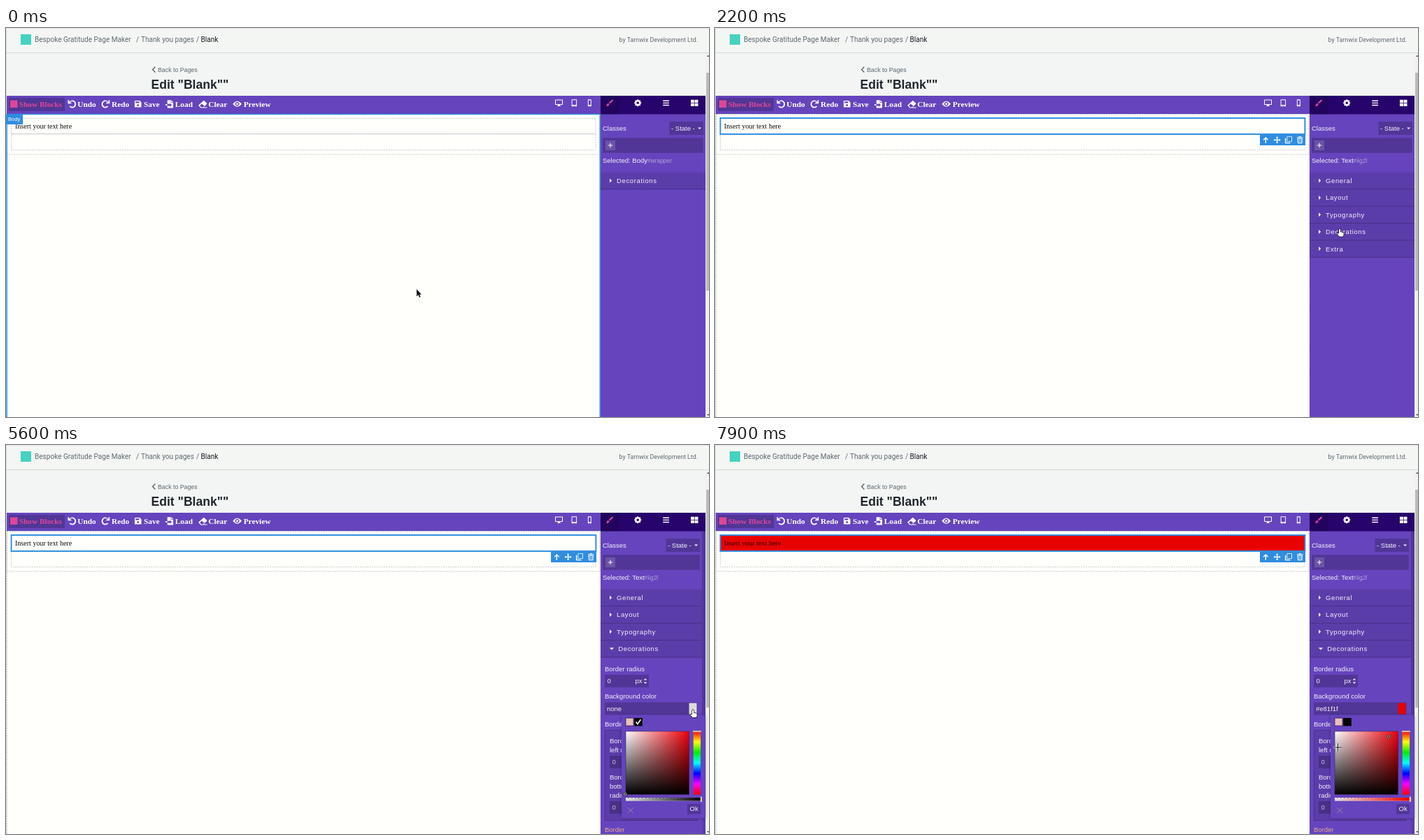
Recreate the animation shown at these times as an HTML page with a canvas. Size 1005 px wide and 557 px high, loop 8 s.

```html
<!DOCTYPE html>
<html lang="en">
<head>
<meta charset="utf-8">
<title>Page editor</title>
<style>
html, body { margin: 0; width: 100%; height: 100%; overflow: hidden; background: #f3f5f3; }
canvas { display: block; }
</style>
</head>
<body>
<canvas id="stage" width="1005" height="557"></canvas>
<script>
const ctx = document.getElementById('stage').getContext('2d');
const LOOP = 8000, STEP = 100;
const SANS = '"Liberation Sans", Arial, sans-serif';
const SERIF = '"Liberation Serif", "Times New Roman", serif';
const ROBOTO = 'Roboto, sans-serif';
const WHITE = '#fffffc', PURPLE = '#6544bd', BLUE = '#2f8de0', PINK = '#dd4697', LABEL = '#f3f0fa';
const SHADE = 'rgba(0,0,0,.2)', DIM = 'rgba(0,0,0,.1)';

const ICONS = {
  undo: 'M0 0h2.3v4A8 8 0 1 1 3 13.8l1.7-1.7A5.6 5.6 0 1 0 4 5h3.2v2.3H0z',
  save: 'M1 0h11l4 4v11q0 1-1 1H1q-1 0-1-1V1q0-1 1-1zM2 2v4h9V2zM8 8.5a2.5 2.5 0 1 0 .01 0z',
  load: 'M4 0h7v5h5v11H4v-4h5v2l4-4-4-4v2H4zM12 0l4 4h-4zM0 8.5h4v2.5H0z',
  clear: 'M10 1.5l5.5 5q.7.8 0 1.5L9.5 14H16v1.5H4.5L.6 11.6q-.8-.8 0-1.6zM6 7.5L2.5 11l3 3h2.5l3-2.2z',
  eye: 'M0 8Q8-2 16 8 8 18 0 8zM8 4.2a3.8 3.8 0 1 0 .01 0zM8 6a2 2 0 1 1-.01 0z',
  desktop: 'M1 1h14q1 0 1 1v9q0 1-1 1h-5l.5 2H12v1H4v-1h1.5L6 12H1q-1 0-1-1V2q0-1 1-1zM1.5 2.5v8h13v-8z',
  tablet: 'M3 0h10q1 0 1 1v14q0 1-1 1H3q-1 0-1-1V1q0-1 1-1zM3.5 1.5v11h9v-11zM7 13.5V15h2v-1.5z',
  phone: 'M5 0h6q1 0 1 1v14q0 1-1 1H5q-1 0-1-1V1q0-1 1-1zM5.5 1.8v10.7h5V1.8zM7.2 13.5V15h1.6v-1.5z',
  brush: 'M15 1c1 1 0 3-1 4L8 10 6 8 12 2c1-1 2-2 3-1zM5 9l2 2c0 3-3 5-7 4 2-1 2-2 2-4 1-2 2-2 3-2z',
  bars: 'M1 2h14v2.2H1zM1 7h14v2.2H1zM1 12h14v2.2H1z',
  grid: 'M0 1h7.4v6.4H0zM8.6 1H16v6.4H8.6zM0 8.6h7.4V15H0zM8.6 8.6H16V15H8.6z',
  up: 'M8 1l6 6-1.6 1.6-3.2-3V15H6.8V5.6l-3.2 3L2 7z',
  move: 'M8 0l3 3.2H9V7h3.8V5L16 8l-3.2 3V9H9v3.8h2L8 16l-3-3.2h2V9H3.2v2L0 8l3.2-3v2H7V3.2H5z',
  copy: 'M5 0h10q1 0 1 1v10q0 1-1 1H5q-1 0-1-1V1q0-1 1-1zM5.3 1.3v9.4h9.4V1.3zM0 4h2.2v9.8H12V16H1q-1 0-1-1z',
  trash: 'M1 1.5h4L6 0h4l1 1.5h4v1.7H1zM2 4.2h12L13 16H3zM4 5.8l.6 8.6h6.8l.6-8.6zM6 7h1v6H6zM9 7h1v6H9z'
};
const ARROW = new Path2D('M0 0V10.2L2.3 8.1 3.9 11.8 5.5 11 4 7.5H7z');
const HAND = new Path2D('M-1 1Q0-.6 1 1V4.5L5 5.5Q6 6 5.7 8L5 11H-.6L-3.6 7.3Q-3.6 5.8-1 7.2z');

// start time, number of steps, end x, end y
const MOVES = [
  [400, 1, 500, 305], [600, 3, 155, 148], [1600, 5, 876, 296], [2200, 1, 893, 287.5],
  [2800, 4, 923, 355], [3200, 3, 906, 336], [3600, 1, 894, 336], [3800, 3, 915, 334],
  [4200, 6, 980, 380], [4900, 2, 982, 379], [5900, 2, 901, 496], [6100, 2, 967.5, 415],
  [7400, 2, 964, 418], [7700, 3, 890.5, 433]
];

function rect(x, y, w, h, color) {
  ctx.fillStyle = color;
  ctx.fillRect(x, y, w, h);
}
function frame(x, y, w, h, color, width = 1, dash = []) {
  ctx.strokeStyle = color;
  ctx.lineWidth = width;
  ctx.setLineDash(dash);
  ctx.strokeRect(x, y, w, h);
  ctx.setLineDash([]);
}
function text(s, x, y, size, color, family = SANS, weight = 400, spacing = 0, align = 'left') {
  ctx.font = `${weight} ${size}px ${family}`;
  ctx.letterSpacing = spacing + 'px';
  ctx.textAlign = align;
  ctx.fillStyle = color;
  ctx.fillText(s, x, y);
}
const label = (s, x, y, color = LABEL) => text(s, x, y, 9.5, color);

function icon(name, cx, cy, size, color, flip = 1) {
  ctx.save();
  ctx.translate(cx, cy);
  ctx.scale(flip * size / 16, size / 16);
  ctx.translate(-8, -8);
  ctx.fillStyle = color;
  ctx.fill(new Path2D(ICONS[name]), 'evenodd');
  ctx.restore();
}
function poly(points, color) {
  ctx.beginPath();
  points.forEach(([x, y]) => ctx.lineTo(x, y));
  ctx.fillStyle = color;
  ctx.fill();
}
const down = (x, y, r, color = LABEL) => poly([[x - r, y - r / 2], [x + r, y - r / 2], [x, y + r / 2]], color);
const upward = (x, y, r, color = LABEL) => poly([[x - r, y + r / 2], [x + r, y + r / 2], [x, y - r / 2]], color);

function line(points, color, width) {
  ctx.beginPath();
  points.forEach(([x, y]) => ctx.lineTo(x, y));
  ctx.strokeStyle = color;
  ctx.lineWidth = width;
  ctx.stroke();
}
function gear(cx, cy) {
  ctx.strokeStyle = WHITE;
  ctx.lineWidth = 2.2;
  ctx.beginPath();
  ctx.arc(cx, cy, 2.9, 0, 7);
  ctx.stroke();
  for (let i = 0; i < 8; i++) {
    const a = i * Math.PI / 4, c = Math.cos(a), s = Math.sin(a);
    line([[cx + c * 3.4, cy + s * 3.4], [cx + c * 5, cy + s * 5]], WHITE, 2);
  }
}
function gradient(x0, y0, x1, y1, colors) {
  const g = ctx.createLinearGradient(x0, y0, x1, y1);
  colors.forEach((c, i) => g.addColorStop(i / (colors.length - 1), c));
  return g;
}
function checker(x, y, w, h, cell, a, b) {
  rect(x, y, w, h, a);
  for (let i = 0; i * cell < w; i++)
    for (let j = 0; j * cell < h; j++)
      if ((i + j) % 2) rect(x + i * cell, y + j * cell, Math.min(cell, w - i * cell), Math.min(cell, h - j * cell), b);
}

function drawHeader() {
  rect(0, 0, 1005, 557, '#f2f5f3');
  rect(0, 0, 1005, 35, '#f4f6f4');
  rect(0, 0, 1005, 1, '#e0e3e1');
  rect(0, 0, 1, 557, '#d5d9d8');
  rect(0, 35, 1005, 1, '#d3d7d6');
  rect(21, 9, 15, 15, '#45d3bf');
  const grey = '#5f6a73';
  text('Bespoke Gratitude Page Maker', 41, 20.2, 10.05, grey, ROBOTO);
  text('/', 186, 20.2, 10.05, grey, ROBOTO);
  text('Thank you pages', 193, 20.2, 10.05, grey, ROBOTO);
  text('/', 272, 20.2, 10.05, grey, ROBOTO);
  text('Blank', 278.5, 20.2, 10.05, '#171d22', ROBOTO);
  text('by Tarnwix Development Ltd.', 989, 20, 8.8, grey, ROBOTO, 400, 0, 'right');
  line([[213.4, 55.6], [209.6, 59.6], [213.4, 63.6]], '#5b6770', 1.4);
  text('Back to Pages', 217, 62.7, 8.79, '#5b6770');
  text('Edit "Blank""', 207.5, 86.7, 17.58, '#20262d', SANS, 700);

  rect(1000, 36, 5, 521, '#f0f1f0');
  rect(1001, 64, 4, 312, '#b9bbba');
  upward(1004, 40, 2, '#444');
  down(1004, 554, 2, '#444');
}

function drawToolbar() {
  rect(1, 97, 849, 26, PURPLE);
  rect(4, 100, 80, 19, SHADE);
  rect(6, 103.5, 10.5, 10.5, PINK);
  const item = (s, x, color = WHITE) => text(s, x, 112.8, 11.3, color, SERIF, 700);
  item('Show Blocks', 18.8, PINK);
  icon('undo', 94, 108.8, 11, WHITE);
  item('Undo', 102.3);
  icon('undo', 142.7, 108.8, 11, WHITE, -1);
  item('Redo', 151);
  icon('save', 188.7, 108.8, 9.6, WHITE);
  item('Save', 197);
  icon('load', 233.5, 108.8, 11.2, WHITE);
  item('Load', 241.8);
  icon('clear', 281.3, 108.8, 12.4, WHITE);
  item('Clear', 289.3);
  icon('eye', 330.6, 108.8, 12.6, WHITE);
  item('Preview', 339.7);
  icon('desktop', 790.5, 107.3, 11, WHITE);
  icon('tablet', 812.3, 107.3, 10, WHITE);
  icon('phone', 834.3, 107.3, 10, WHITE);
}

function badge(s, x) {
  const w = s === 'Body' ? 24 : 20;
  rect(x, 123, w, 15, BLUE);
  text(s, x + 3, 133.2, 7.6, WHITE);
}

function drawPage(t, cur) {
  const picked = t >= 1300, red = t >= 6400;
  const dash = [2, 1.4], grey = '#b9bab8';
  rect(1, 123, 849, 434, WHITE);
  frame(1.5, 123.5, 847.5, 440, grey, .8, dash);
  frame(1.5, 123.5, 847.5, 57.5, grey, .8, dash);
  frame(7.5, 129.3, 835.5, 22.4, grey, .8, dash);
  frame(7.5, 151.7, 835.5, 23, grey, .8, dash);

  if (!picked) frame(1.2, 123.5, 848, 440, BLUE, 1.4);
  if (red) rect(8, 129.5, 835, 22.5, '#e90202');
  text('Insert your text here', 13, 144, 10.05, red ? '#2c0000' : '#0c0c0c', SERIF);

  if (picked) {
    frame(7.6, 129, 835.8, 23, BLUE, 1.9);
    rect(779, 153, 65, 15, BLUE);
    ['up', 'move', 'copy', 'trash'].forEach((n, i) => icon(n, 787.3 + i * 16.3, 160.3, 10, WHITE));
  }
  const inside = cur.x < 850 && cur.y > 123;
  if (inside) {
    const onText = cur.y < 165 && cur.x < 300;
    if (onText) {
      if (!picked) frame(7.6, 129.3, 835.8, 22.5, BLUE, .8);
      badge('Text', 7);
    } else {
      if (picked) frame(1.2, 123.5, 848, 440, BLUE, .8);
      badge('Body', 0);
    }
  }
}

function numberField(x, y, w, color) {
  rect(x, y, w, 18, SHADE);
  label('0', x + 3.5, y + 12.4, color);
  label('px', x + w - 19.5, y + 12.4, color);
  upward(x + w - 5, y + 6.4, 2.4);
  down(x + w - 5, y + 11.8, 2.4);
}

function sector(name, i, open, w) {
  const y = 206.7 + i * 24.4;
  rect(850, y, w, 24.4, DIM);
  rect(850, y + 23.6, w, .9, 'rgba(0,0,0,.25)');
  if (open) down(866, y + 12, 3.2);
  else poly([[863, y + 8.8], [863, y + 14.8], [866.2, y + 11.8]], LABEL);
  text(name, open ? 875.3 : 873, y + 15.2, 9.5, LABEL, SANS, 400, .628);
}

function drawDecorations(t) {
  label('Border radius', 856, 323.8);
  numberField(856, 329, 63, LABEL);
  label('Background color', 856, 363.3);
  rect(856, 368.5, 132.5, 18, SHADE);
  const value = t < 6400 ? 'none' : t < 7400 ? '#ef1414' : t < 7500 ? '#e81717' : t < 7700 ? '#e81a1a' : '#e81f1f';
  label(value, 859, 381);
  rect(976.5, 369.5, 11, 16, t < 6400 ? '#dddcdc' : '#e90202');
  label('Border radius', 856, 402.8);
  rect(856, 408, 132.5, 130, DIM);
  frame(856.4, 408.4, 131.7, 129.2, 'rgba(0,0,0,.22)', .8);
  [[863, 'left', 'right'], [925.5, 'right', 'left']].forEach(([x, side, low]) => {
    label('Border top', x, 427.2);
    label((x < 900 ? 'left' : 'right') + ' radius', x, 440);
    numberField(x, 445, 56.5, 'rgba(255,255,255,.7)');
    label('Border', x, 479.3);
    label('bottom ' + low, x, 492);
    label('radius', x, 504.6);
    numberField(x, 510, 56.5, 'rgba(255,255,255,.7)');
  });
  label('Border', 856, 553.8, '#e8ab92');
}

function drawPanel(t) {
  const open = t >= 2600, w = open ? 145 : 150, right = 850 + w;
  rect(850, 97, 150, 460, PURPLE);
  rect(850, 97, 150, 26.5, '#27046b');
  rect(850, 97, 27, 26.5, 'rgba(0,0,0,.12)');
  icon('brush', 863, 107.3, 10.5, PINK);
  gear(903.2, 107.3);
  icon('bars', 943.6, 107.3, 10, WHITE);
  icon('grid', 984.2, 107.3, 10.5, WHITE);

  label('Classes', 853, 147);
  rect(right - 51.5, 134, 48.5, 19, SHADE);
  label('- State -', right - 49, 147);
  down(right - 8.4, 143.8, 2.6);
  rect(853, 157.3, w - 6.3, 21.5, SHADE);
  rect(857, 161, 14, 14.2, 'rgba(255,255,255,.15)');
  line([[860.8, 168], [867.2, 168]], LABEL, 1.1);
  line([[864, 164.8], [864, 171.2]], LABEL, 1.1);
  const body = t < 1300;
  label('Selected:', 853, 193);
  label(body ? 'Body' : 'Text', 895.3, 193);
  text(body ? '#wrapper' : '#iig2l', body ? 917 : 912.6, 193, 8.4, 'rgba(255,255,255,.5)');

  if (body) sector('Decorations', 0, false, w);
  else ['General', 'Layout', 'Typography', 'Decorations', 'Extra'].slice(0, open ? 4 : 5)
    .forEach((s, i) => sector(s, i, open && i === 3, w));
  if (open) {
    drawDecorations(t);
    rect(995, 123.5, 5, 433.5, DIM);
    rect(995, 123.5, 5, 270, DIM);
  }
}

function drawPicker(t) {
  const set = t >= 6400;
  ctx.save();
  ctx.shadowColor = 'rgba(0,0,0,.3)';
  ctx.shadowBlur = 4;
  rect(880, 386.5, 119.5, 148, PURPLE);
  ctx.restore();

  checker(886, 391, 11, 11, 1.9, '#f0d2cc', '#dfb0ac');
  frame(886, 391, 11, 11, '#241544', .7);
  rect(898.2, 390.8, 11.6, 11.6, '#050505');
  if (!set) line([[900.6, 396.5], [903, 399.6], [907.3, 393]], '#fff', 1.7);

  rect(886, 410, 90.5, 90.5, '#ef0008');
  rect(886, 410, 90.5, 90.5, gradient(886, 0, 976.5, 0, ['#fff', 'rgba(255,255,255,0)']));
  rect(886, 410, 90.5, 90.5, gradient(0, 410, 0, 500.5, ['rgba(0,0,0,0)', '#000']));
  frame(886, 410, 90.5, 90.5, '#32215f', .6);
  rect(982.7, 410, 10.3, 90.5, gradient(0, 410, 0, 500.5, ['#f00', '#ff0', '#0e0', '#0ff', '#00f', '#f0f', '#f00']));
  rect(982, 409, 11.8, 2.2, '#d9b9a0');
  checker(886, 505, 107.5, 4.5, 2.5, '#fff', '#c8c8c8');
  rect(886, 505, 107.5, 4.5, gradient(886, 0, 993.5, 0, set ? ['rgba(240,0,0,0)', '#f00000'] : ['rgba(0,0,0,0)', '#000']));
  rect(992.8, 503.6, 2.2, 7.4, '#d6d0b4');

  line([[889, 519.2], [897, 527.2]], '#9b94a0', .9);
  line([[897, 519.2], [889, 527.2]], '#9b94a0', .9);
  rect(974, 514, 19, 14.5, SHADE);
  label('Ok', 977.5, 524.4);

  const [bx, by] = !set ? [885.2, 499.8] : t < 7400 ? [967.8, 415.3] : t < 7700 ? [964.5, 417.5] : [963.3, 417.5];
  ctx.beginPath();
  ctx.arc(bx, by, 1.9, 0, 7);
  ctx.strokeStyle = '#000';
  ctx.lineWidth = 1.8;
  ctx.stroke();
  ctx.strokeStyle = '#f4f4f4';
  ctx.lineWidth = .8;
  ctx.stroke();
}

function cursorAt(t) {
  let x = 587, y = 374;
  for (const [start, steps, ex, ey] of MOVES) {
    if (t < start) break;
    const k = Math.min(1, (Math.floor((t - start) / STEP) + 1) / steps);
    x += (ex - x) * k;
    y += (ey - y) * k;
  }
  const within = (x0, y0, x1, y1) => x >= x0 && x <= x1 && y >= y0 && y <= y1;
  let kind = 'arrow';
  if (t >= 5600) {
    if (within(885, 409, 977, 501)) kind = 'cross';
    else if (within(976, 368, 989, 387)) kind = 'hand';
  } else if (t >= 2600) {
    if (within(850, 207, 995, 304) || within(976, 368, 989, 387)) kind = 'hand';
    else if (within(856, 329, 910, 347) || within(856, 368, 976, 387)) kind = 'beam';
  } else if (within(850, 207, 1000, 329)) kind = 'hand';
  return { x, y, kind };
}

function drawCursor({ x, y, kind }) {
  ctx.save();
  ctx.translate(x, y);
  ctx.lineJoin = 'round';
  if (kind === 'arrow' || kind === 'hand') {
    const shape = kind === 'arrow' ? ARROW : HAND;
    ctx.strokeStyle = kind === 'arrow' ? '#fff' : '#111';
    ctx.lineWidth = 1.3;
    ctx.stroke(shape);
    ctx.fillStyle = kind === 'arrow' ? '#0a0a0a' : '#fff';
    ctx.fill(shape);
  } else {
    for (const [color, width] of [['#fff', 2.6], ['#111', 1.1]]) {
      if (kind === 'cross') line([[-6, 0], [6, 0]], color, width);
      else [-5.2, 5.2].forEach(d => line([[-2.4, d], [2.4, d]], color, width));
      line([[0, -5.8], [0, 5.8]], color, width);
    }
  }
  ctx.restore();
}

function draw(now) {
  const t = now % LOOP, cur = cursorAt(t);
  drawHeader();
  drawToolbar();
  drawPage(t, cur);
  drawPanel(t);
  if (t >= 5600) drawPicker(t);
  drawCursor(cur);
}

const begin = performance.now();
function tick() {
  draw(performance.now() - begin);
  requestAnimationFrame(tick);
}
tick();
</script>
</body>
</html>
```
